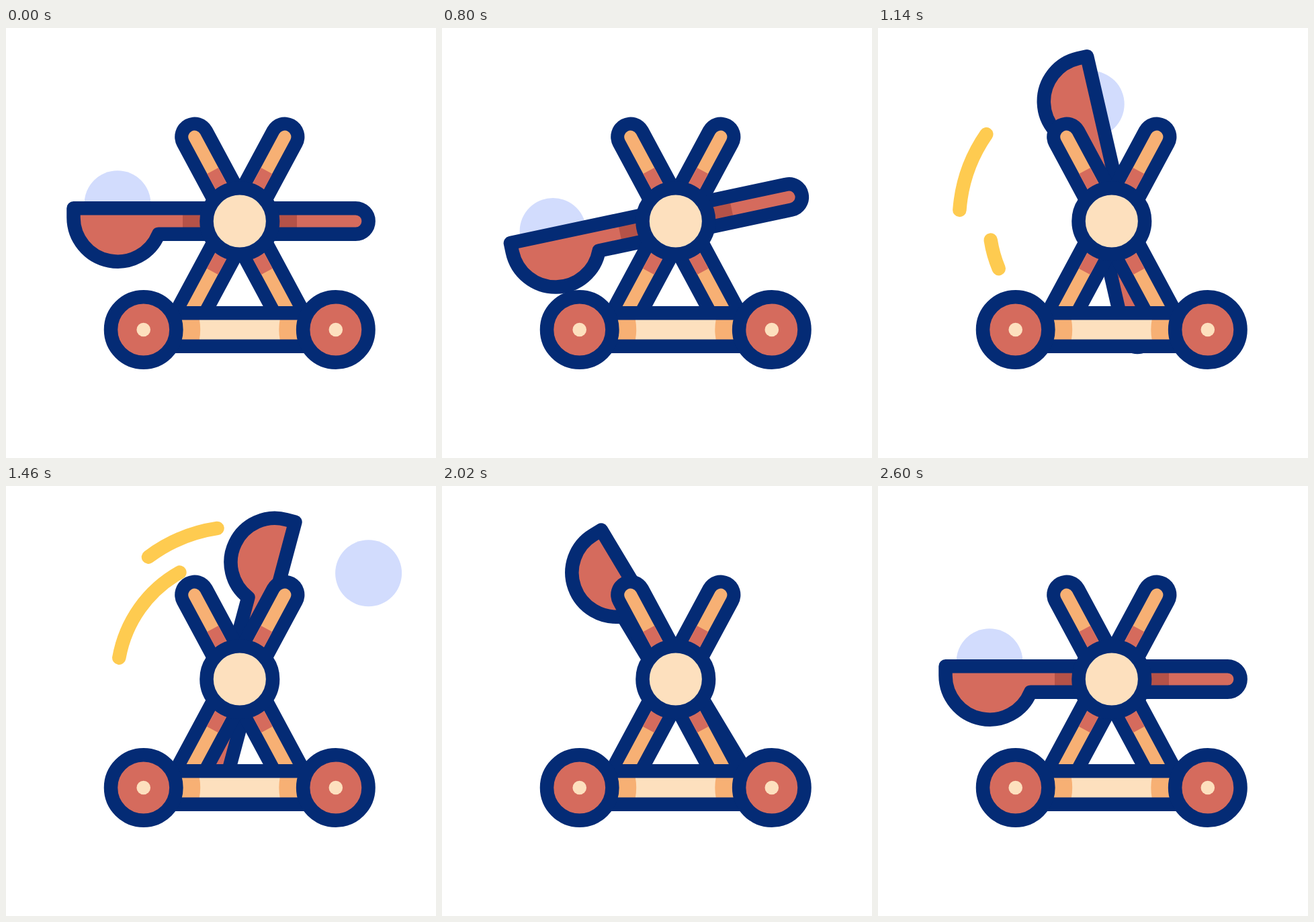
An HTML page that plays this animation: 640x640 px, repeating every 3000 ms.

```html
<!DOCTYPE html>
<html lang="en">
<head>
<meta charset="utf-8">
<title>Catapult</title>
<style>
  html, body { margin: 0; width: 100%; height: 100%; overflow: hidden; background: #fff; }
  svg { display: block; width: 100vw; height: 100vh; }
  .line { stroke: #042b75; stroke-width: 20.5; stroke-linejoin: round; }
  .edge { stroke: #042b75; stroke-width: 59; stroke-linecap: round; }
  .wood { stroke: #f7b074; stroke-width: 19; stroke-linecap: round; }
  .band { stroke: #d56b5d; stroke-width: 19; }
  .streak { fill: none; stroke: #fecb50; stroke-width: 20.5; stroke-linecap: round; }
  .red { fill: #d56b5d; }
  .dark { fill: #b55248; }
  .cream { fill: #fde0be; }
  .orange { fill: #f7b074; }
</style>
</head>
<body>
<svg viewBox="0 0 640 640">
  <defs>
    <clipPath id="plank"><rect x="204" y="424" width="287" height="50"/></clipPath>
    <g id="beam">
      <path class="edge" d="M280.7 162 421.5 424"/>
      <path class="wood" d="M280.7 162 421.5 424"/>
      <path class="band" d="M307.7 212.6 388.3 362.4"/>
    </g>
    <g id="wheel">
      <circle class="red line" r="48.7"/>
      <circle class="cream" r="10.3"/>
    </g>
  </defs>

  <circle id="ball" r="49.5" fill="#d2dcfd"/>
  <path id="outer" class="streak"/>
  <path id="inner" class="streak"/>

  <g id="arm">
    <path id="lever" class="red" d="M100.5 268.2H520.3a19.3 19.3 0 0 1 0 38.6H227A65.7 65.7 0 0 1 100.5 282Z"/>
    <path class="dark" d="M263 268.2H433V306.8H263Z"/>
    <use href="#lever" class="line" fill="none" id="rim"/>
  </g>

  <use href="#beam"/>
  <use href="#beam" transform="matrix(-1 0 0 1 695.6 0)"/>
  <circle class="cream line" cx="347.8" cy="287.5" r="49.3"/>

  <g clip-path="url(#plank)">
    <rect class="cream" x="204" y="424" width="287" height="50"/>
    <circle class="orange" cx="204.7" cy="449" r="84.5"/>
    <circle class="orange" cx="490.8" cy="449" r="84.5"/>
  </g>
  <rect class="line" x="204.7" y="424.2" width="286.1" height="49.5" fill="none"/>
  <use href="#wheel" x="204.7" y="449"/>
  <use href="#wheel" x="490.8" y="449"/>
</svg>
<script>
  const LOOP = 3000, CX = 347.8, CY = 287.5;
  const el = id => document.getElementById(id);
  const [arm, ball, outer, inner] = ['arm', 'ball', 'outer', 'inner'].map(el);

  // The rim is a stroked copy of the lever outline, above the dark section.
  const rim = document.createElementNS('http://www.w3.org/2000/svg', 'path');
  rim.setAttribute('d', el('lever').getAttribute('d'));
  rim.setAttribute('class', 'line');
  rim.setAttribute('fill', 'none');
  el('rim').replaceWith(rim);

  const ramp = (t, a, b) => Math.min(1, Math.max(0, (t - a) / (b - a)));
  const ease = (t, a, b) => { const p = ramp(t, a, b); return p * p * (3 - 2 * p); };

  // Angle 0 points left of the hub and grows clockwise.
  const polar = (r, deg) => {
    const a = deg * Math.PI / 180;
    return [CX - r * Math.cos(a), CY - r * Math.sin(a)];
  };

  const armAngle = t =>
    -12 * ease(t, 200, 800) + 117 * ease(t, 800, 1300) - 105 * ease(t, 1700, 2400);

  function ballAt(t) {
    if (t < 800) {
      const p = ease(t, 200, 740);
      return [166 - 0.7 * p, 261.7 + 40.8 * p];
    }
    if (t < 1140) {
      const p = (armAngle(t) + 12) / (armAngle(1140) + 12);
      return polar(183.3 - 6.5 * p, -4.7 + 84.5 * p);
    }
    if (t < 2000) {
      const d = t - 1140;
      return [316.5 + 0.695 * d, 113.5 - 0.126 * d + 5.5e-4 * d * d];
    }
    return [166, 161.7 + 100 * ease(t, 2360, 2600)];
  }

  function drawStreak(path, r, from, sweep, lead, trail) {
    const show = lead > 0 && lead - trail > 0.002;
    path.style.display = show ? '' : 'none';
    if (!show) return;
    const a = polar(r, from + sweep * trail), b = polar(r, from + sweep * lead);
    path.setAttribute('d', `M${a}A${r} ${r} 0 0 1 ${b}`);
  }

  function draw(t) {
    arm.setAttribute('transform', `rotate(${armAngle(t)} ${CX} ${CY})`);
    const [x, y] = ballAt(t);
    ball.setAttribute('cx', x);
    ball.setAttribute('cy', y);
    ball.setAttribute('opacity', t < 2000 ? 1 : ramp(t, 2360, 2440));
    drawStreak(outer, 227, 4.2, 80, ease(t, 855, 1535), ease(t, 1150, 1690));
    drawStreak(inner, 182.3, -22.8, 95, ease(t, 998, 1590), ease(t, 1226, 1820));
  }

  const start = performance.now();
  function tick() {
    draw((performance.now() - start) % LOOP);
    requestAnimationFrame(tick);
  }
  tick();
</script>
</body>
</html>
```
